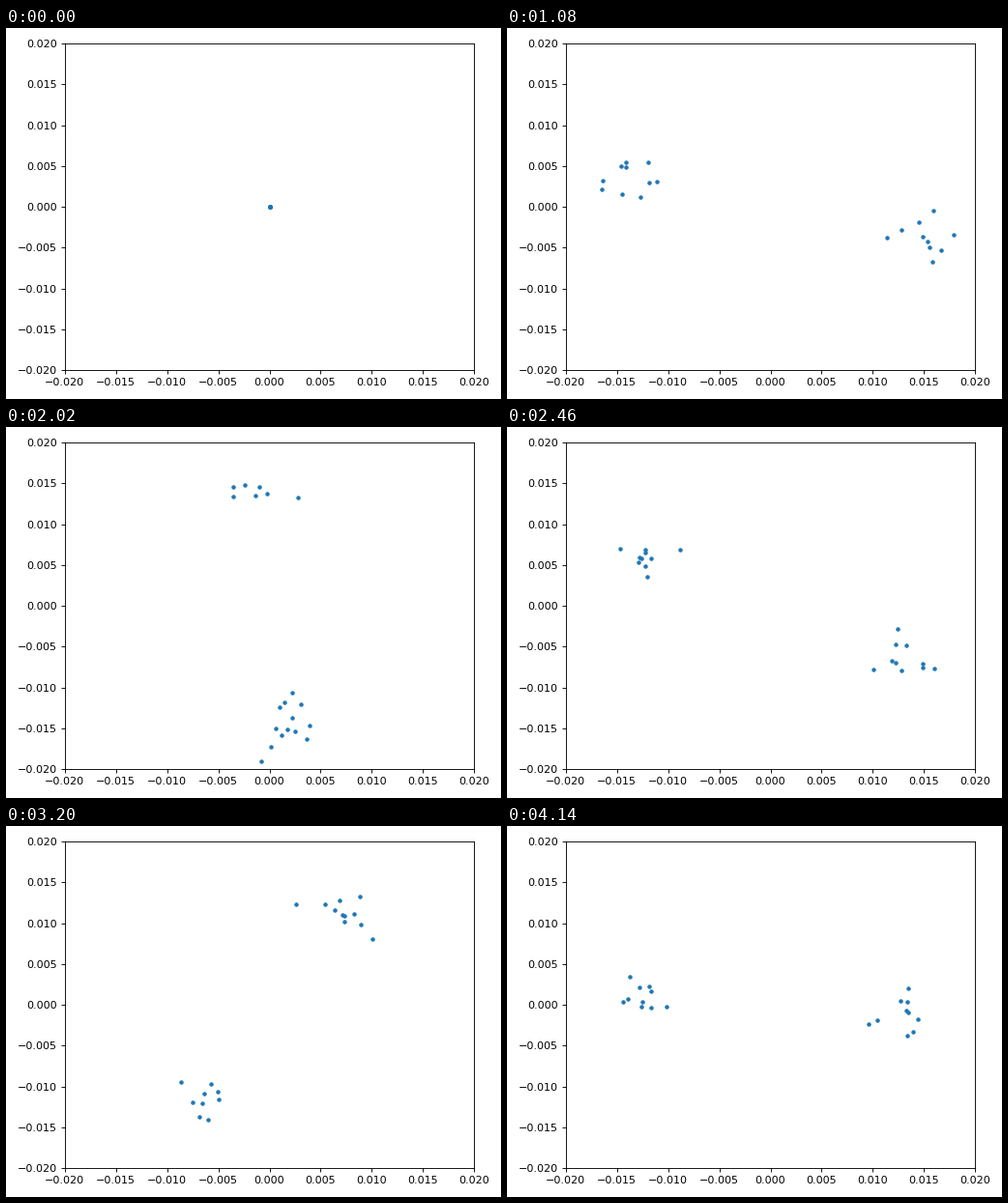
Write a matplotlib script that moves like this. It is 512x384 px and loops after 4.16 s.

```python
import matplotlib.pyplot as plt
import numpy as np
from matplotlib.animation import FuncAnimation

FRAMES, STEP_MS = 208, 20
HOLD = 9                     # frames at rest in the centre
COUNT = 20
LIMIT = 0.02
RADIUS, DECAY = 0.0157, 1.45e-5
SIGMA = 0.0017
ANGLE, TURN = np.radians(56.5), np.radians(2.42)

fig, ax = plt.subplots(figsize=(6.4, 4.8), dpi=80)
ax.set_xlim(-LIMIT, LIMIT)
ax.set_ylim(-LIMIT, LIMIT)
fig.tight_layout()
dots, = ax.plot([], [], ".", color="C0")


def cloud(frame):
    """Sample two opposite clusters that turn and slowly draw inwards."""
    k = frame - HOLD
    if k < 0:
        return np.zeros(COUNT), np.zeros(COUNT)
    rng = np.random.default_rng(1000 + k)
    side = rng.choice([-1, 1], COUNT)
    dx, dy = rng.normal(0, SIGMA, (2, COUNT))
    r = side * (RADIUS - DECAY * k)
    a = ANGLE + TURN * k
    return r * np.cos(a) + dx, r * np.sin(a) + dy


def update(frame):
    dots.set_data(*cloud(frame))
    return dots,


anim = FuncAnimation(fig, update, frames=FRAMES, interval=STEP_MS,
                     repeat=True, repeat_delay=0)
plt.show()
```
